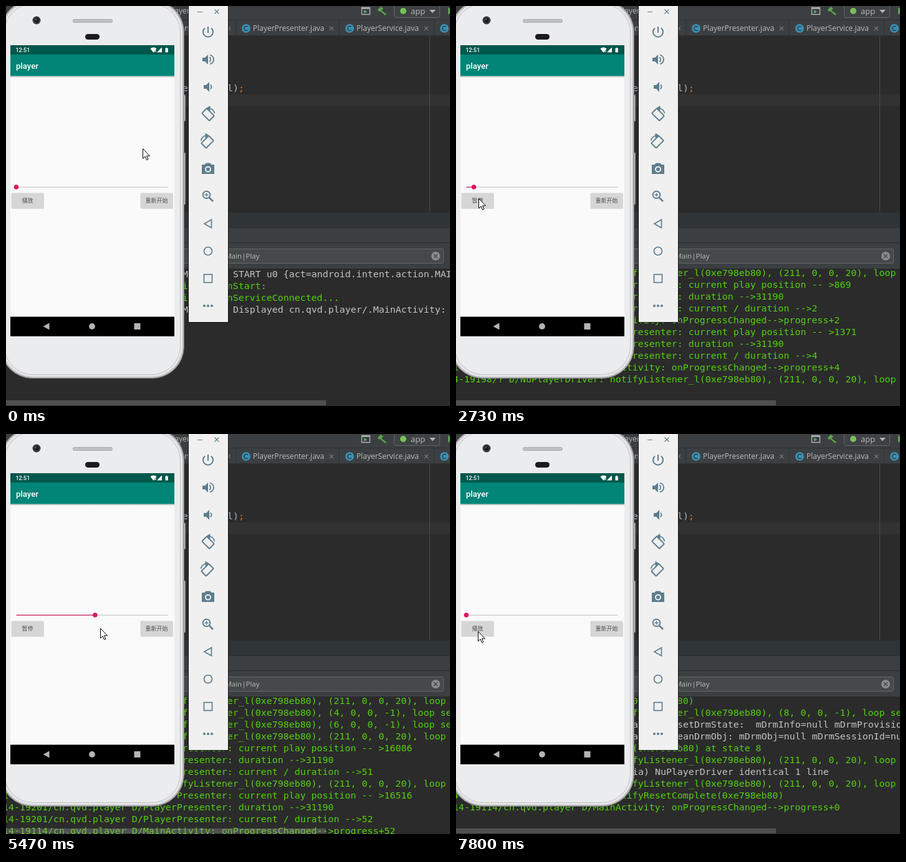
An HTML page for the animation above (8 s loop, 712 by 643 pixels).

```html
<!DOCTYPE html>
<html lang="en">
<head>
<meta charset="utf-8">
<title>Player demo</title>
<style>
  html, body { margin: 0; width: 100%; height: 100%; overflow: hidden; background: #2b2b2b; }
  svg { display: block; width: 712px; height: 643px; }
  text { white-space: pre; }
  .ui { font: 12px "Open Sans", "Noto Sans", sans-serif; fill: #bbb; }
  .mono { font: 14.95px "DejaVu Sans Mono", monospace; }
  .phone { font-family: Roboto, sans-serif; fill: #fff; }
  .btn { font: 9px "Noto Sans CJK SC", "Noto Sans CJK", sans-serif; fill: #505050; text-anchor: middle; }
  .tool { fill: none; stroke: #5d7d8d; stroke-width: 2; }
  .tool .solid { fill: #5d7d8d; stroke: none; }
</style>
</head>
<body>
<svg viewBox="0 0 712 643">
  <defs>
    <clipPath id="logClip"><rect y="423" width="712" height="220"/></clipPath>
    <linearGradient id="shade" x2="0" y2="1">
      <stop stop-color="#000" stop-opacity=".3"/><stop offset="1" stop-color="#000" stop-opacity="0"/>
    </linearGradient>
    <g id="classTab">
      <circle cx="17" cy="36" r="7" fill="#3d8fb2"/>
      <path d="M19.8 33.6a3.5 3.5 0 1 0 0 4.8" fill="none" stroke="#26414e" stroke-width="1.5"/>
    </g>
    <path id="cross" d="M-3-3 3 3M3-3-3 3" fill="none" stroke="#777" stroke-width="1.1"/>
    <g id="rotate">
      <rect x="-5.5" y="-8.5" width="11" height="17" rx="1" transform="rotate(-45)"/>
      <path d="M1-10.500A11 11 0 0 1 10.500-2" stroke-width="1.6"/>
      <path class="solid" d="M-1-10.500 2.500-12.500V-8Z"/>
    </g>
  </defs>

  <!-- editor window -->
  <g>
    <rect width="712" height="48" fill="#3c3f41"/>
    <path d="M240 22.500H712M368.500 23V48M534.500 23V48M686.500 23V48M286 47.500H712" stroke="#2e3133" fill="none"/>
    <text class="ui" x="260" y="12">Player</text>
    <text class="ui" x="279" y="40">on</text>
    <use href="#cross" x="357" y="36"/>
    <use href="#classTab" x="368"/>
    <text class="ui" x="396" y="40">PlayerPresenter.java</text>
    <use href="#cross" x="522" y="36"/>
    <use href="#classTab" x="534"/>
    <text class="ui" x="562" y="40">PlayerService.java</text>
    <use href="#cross" x="674" y="36"/>
    <use href="#classTab" x="686"/>
    <path d="M570.500 2.500H583.500V13.500H570.500ZM570 4H584" fill="none" stroke="#afb1b3" stroke-width="1.4"/>
    <path d="M574 6 579 9 574 12Z" fill="#59a869"/>
    <path d="M596 6 601 1 605 4 602 7 610 13 608 15 600 8 598 9Z" fill="#59a84b"/>
    <rect x="622.500" y="-4" width="73" height="22.500" rx="3" fill="#3f4244" stroke="#646769"/>
    <circle cx="637" cy="8" r="5" fill="#78c257"/>
    <text class="ui" x="649" y="13" style="font-size:13px">app</text>
    <path d="M679 6H689L684 11.500Z" fill="#afb1b3"/>
    <path d="M709 2 716 8 709 14Z" fill="#59a84b"/>

    <rect y="48" width="712" height="283" fill="#2b2b2b"/>
    <rect y="142" width="712" height="19" fill="#323232"/>
    <path d="M679.500 48V331" stroke="#4b4b4b"/>
    <g class="mono" fill="#a9b7c6">
      <text x="283" y="137">e</text>
      <text x="355" y="137">l)<tspan fill="#cc7832">;</tspan></text>
    </g>

    <rect y="331" width="712" height="92" fill="#3c3f41"/>
    <rect y="331" width="712" height="25" fill="#2f3437"/>
    <path d="M0 331.500H712M0 356.500H712M0 380.500H712M0 422.500H712" stroke="#292c2e"/>
    <rect x="240.500" y="390.500" width="461" height="23" rx="2" fill="#45494a" stroke="#646667"/>
    <text class="ui" x="406.500" y="406" text-anchor="end" style="font-size:11.5px">Main|Play</text>
    <circle cx="689" cy="402" r="7" fill="#8a8d8f"/>
    <path d="M686 399 692 405M692 399 686 405" stroke="#45494a" stroke-width="1.5"/>
    <rect y="423" width="712" height="220" fill="#2b2b2b"/>
    <g id="log" class="mono" clip-path="url(#logClip)"></g>
    <rect y="634" width="513" height="8" fill="#a6a6a6" fill-opacity=".3"/>
  </g>

  <!-- phone -->
  <g class="phone">
    <path d="M285 143H287.500V185H285ZM285 236H287.500V319H285Z" fill="#d8d8da" stroke="#77797c"/>
    <rect x="-8.500" y="-9.500" width="294" height="608" rx="51" fill="#b9b8bb" stroke="#77767a"/>
    <rect x="-6" y="-7" width="289" height="603" rx="49" fill="#e6e6e8"/>
    <rect x="-2.500" y="-3.500" width="282" height="596" rx="46" fill="#ebecee" stroke="#c2c2c6"/>
    <circle cx="49" cy="23" r="6.500" fill="#3a3a3c"/>
    <circle cx="49" cy="23" r="3.500" fill="#17181c"/>
    <circle cx="48" cy="22" r="1.300" fill="#65686f"/>
    <rect x="107.500" y="21.500" width="63" height="5" rx="2" fill="#bfc0c3" stroke="#aaabae"/>
    <rect x="127" y="45" width="23" height="9" rx="4.500" fill="#1b1b1d"/>

    <rect x="7" y="63" width="263" height="468" fill="#fafafa"/>
    <rect x="7" y="112.500" width="263" height="3" fill="url(#shade)"/>
    <rect x="7" y="78" width="263" height="34.500" fill="#008577"/>
    <rect x="7" y="63" width="263" height="15" fill="#00574b"/>
    <text x="15.500" y="74" font-size="9" font-weight="500">12:51</text>
    <text x="16" y="101" font-size="13.2" font-weight="500">player</text>
    <path d="M231.500 68.500Q236.500 64.500 241.500 68.500L236.500 75ZM250 66.500V74.500H242ZM255.500 68H256.500V67H258.500V68H259.800V74.500H255.500Z"/>
    <path d="M238 71 241 74M241 71 238 74" stroke="#fff"/>
    <rect x="7" y="499.500" width="263" height="31.500" fill="#000"/>
    <path d="M59.500 515 69.500 509.500V520.500ZM205.500 510H215.500V520H205.500Z" fill="#b4b4b4"/>
    <circle cx="138" cy="515" r="4.900" fill="#b4b4b4"/>

    <path d="M16.500 291.300H259.500" stroke="#d2d2d2" stroke-width="1.5"/>
    <path id="played" stroke="#d81b60" stroke-opacity=".8" stroke-width="1.5"/>
    <circle id="halo" cy="291" r="10" fill="#d81b60" fill-opacity=".25"/>
    <circle id="thumb" cy="291" r="3.800" fill="#d81b60"/>

    <path d="M9 302.500H61V326H9ZM216 302.500H268V326H216Z" fill="#000" fill-opacity=".14"/>
    <rect id="playBtn" x="8.500" y="300.500" width="52" height="24" rx="1.2"/>
    <rect id="resetBtn" x="215.500" y="300.500" width="52" height="24" rx="1.2"/>
    <text id="playLabel" class="btn" x="34.500" y="315.700"></text>
    <text class="btn" x="241.500" y="315.700">重新开始</text>
  </g>

  <!-- emulator toolbar -->
  <rect x="292.500" y="-2" width="64" height="510.500" fill="#f0f0f0" stroke="#151515"/>
  <g class="tool">
    <path d="M307 9.500H315M334.500 5.500 341.500 12.500M341.500 5.500 334.500 12.500" stroke-width="1.2"/>
    <path d="M324 33V43M319 35.500A8 8 0 1 0 329 35.500"/>
    <path class="solid" d="M315 83H319L324 78V94L319 89H315ZM317 127H321L326 122V138L321 133H317Z"/>
    <path d="M326.500 82Q329.500 86 326.500 90M327 78.500C335 81 335 91 327 93.500M328 126.500Q331 130 328 133.500" stroke-width="1.8"/>
    <use href="#rotate" x="324" y="174.500"/>
    <use href="#rotate" transform="matrix(-1 0 0 1 323 218.500)"/>
    <path class="solid" fill-rule="evenodd" d="M314 255H318.500L320.500 252.500H327.500L329.500 255H334V270H314ZM324 257.500A5 5 0 1 0 324 267.500 5 5 0 1 0 324 257.500Z"/>
    <circle class="solid" cx="324" cy="262.500" r="3"/>
    <circle cx="321.500" cy="303.500" r="5.800"/>
    <path d="M326 308 332 314" stroke-width="2.5"/>
    <path d="M318.500 303.500H324.500M321.500 300.500V306.500" stroke-width="1.4"/>
    <path d="M318 350 329.500 343.500V356.500Z" stroke-width="1.7"/>
    <circle cx="324" cy="394" r="6.500" stroke-width="1.7"/>
    <rect x="317.500" y="431.500" width="13" height="13" stroke-width="1.7"/>
    <g class="solid"><circle cx="318" cy="482" r="2"/><circle cx="324" cy="482" r="2"/><circle cx="330" cy="482" r="2"/></g>
  </g>

  <path id="cursor" d="M.5.500V16.200L4.100 12.800 6.600 18.600 9 17.500 6.500 12H11.500Z" fill="#fff" stroke="#000"/>
</svg>

<script>
const LOOP = 8000, TICK = 1000 / 15;
const MAX_ROWS = 12, ROW_HEIGHT = 19, DURATION = 31190;
const PLAY = 670, SEEK = 4450, RESET = 6590;
const POLL_EVERY = 490, LOG_LAG = 165, EVENT_LAG = 225, SCROLL_LAG = 60;
const GREEN = '#55cf12', GREY = '#c4c4c4';
const $ = id => document.getElementById(id);

// Build the session: log lines and seek bar positions, each with its time
const lines = [];
const marks = [{ at: 0, percent: 0 }];
let clock = -EVENT_LAG;

const add = (x, text, fill = GREEN, lag = EVENT_LAG) => lines.push({ at: clock + lag, x, text, fill });
const activity = (text, lag) => add(-5, '14-19114/cn.qvd.player D/MainActivity: ' + text, GREEN, lag);
const presenter = text => add(-5, '14-19201/cn.qvd.player D/PlayerPresenter: ' + text, GREEN, LOG_LAG);
const driver = (text, x = -14) => add(x, '14-19198/? D/NuPlayerDriver: ' + text);
const system = (text, x = 211) => add(x, text, GREY);
const notify = (args = '211, 0, 0, 20') =>
  driver(`notifyListener_l(0xe798eb80), (${args}), loop setting(0, 0)`);

function setProgress(percent) {
  if (percent === marks.at(-1).percent) return;
  marks.push({ at: clock, percent });
  activity('onProgressChanged-->progress+' + percent, LOG_LAG);
}
function poll(position, wait = POLL_EVERY) {
  clock += wait;
  const percent = Math.floor(100 * position / DURATION);
  presenter('current play position -- >' + position);
  presenter('duration -->' + DURATION);
  presenter('current / duration -->' + percent);
  setProgress(percent);
}

system('ActivityManager: START u0 {act=android.intent.action.MAIN');
activity('onStart:');
activity('onServiceConnected...');
system('ActivityManager: Displayed cn.qvd.player/.MainActivity: +1s');

clock = PLAY - EVENT_LAG + 60;
driver('start(0xe798eb80), state is 4, eos is 0');
notify('5, 0, 0, 0');
clock = PLAY;
poll(0, 100);
notify('6, 0, 0, -1'); notify(); notify();
poll(366); notify();
poll(869); poll(1371); notify();
poll(1871); notify();
poll(2373); poll(2875); notify();
poll(3377);

clock = SEEK;
setProgress(51);
notify(); notify('4, 0, 0, -1'); notify('6, 0, 0, -1'); notify();
poll(16086, 350); notify();
poll(16516); poll(17019); poll(17521);

clock = RESET;
driver('stop(0xe798eb80)', -23);
notify('8, 0, 0, -1');
system('MediaPlayer: resetDrmState:  mDrmInfo=null mDrmProvisioning', 220);
system('MediaPlayer: cleanDrmObj: mDrmObj=null mDrmSessionId=null', 220);
driver('reset(0xe798eb80) at state 8', -23);
notify();
system('uid=1013(media) NuPlayerDriver identical 1 line', 175);
notify();
driver('notifyResetComplete(0xe798eb80)');
setProgress(0);

// Pointer moves; bow bends the way downwards
const moves = [];
let pointer = { x: 219, y: 229 };
function move(start, end, x, y, bow = 0) {
  const to = { x, y };
  moves.push({ start, end, from: pointer, to, bow });
  pointer = to;
}
move(0, 530, 36, 309, 215);
move(3200, 3870, 113, 286, -14);
move(3870, 4270, 140, 290);
move(5270, 5470, 151, 312);
move(5470, 5930, 240, 315);
move(7130, 7800, 35, 317, 10);

function pointerAt(t) {
  const { start, end, from, to, bow } = moves.findLast(m => m.start <= t);
  const k = Math.min(1, (t - start) / (end - start));
  const x = from.x + (to.x - from.x) * k;
  const y = from.y + (to.y - from.y) * k + bow * Math.sin(Math.PI * k);
  return [Math.round(x), Math.round(y)];
}

const arrived = t => lines.filter(line => line.at <= t).length;
// Rises and falls once
const pulse = (t, start, length = 400) => Math.sin(Math.PI * Math.min(1, Math.max(0, (t - start) / length)));
const buttonFill = press => {
  const v = 214 - 24 * press;
  return `rgb(${v},${v},${v})`;
};

const rows = Array.from({ length: MAX_ROWS }, () =>
  $('log').appendChild(document.createElementNS('http://www.w3.org/2000/svg', 'text')));

function draw(t) {
  // New lines first fill the spare rows, then the log settles
  const settledRows = t > SEEK + 900 && t < RESET ? MAX_ROWS : MAX_ROWS - 2;
  const end = arrived(t);
  const top = Math.max(0, end - MAX_ROWS, arrived(t - SCROLL_LAG) - settledRows);
  const padding = top ? 0 : 2;
  rows.forEach((row, i) => {
    const { x = 0, text = '', fill = GREEN } = lines.slice(0, end)[top + i] || {};
    row.textContent = text;
    row.setAttribute('x', x);
    row.setAttribute('y', 434 + padding + ROW_HEIGHT * i);
    row.setAttribute('fill', fill);
  });

  const x = 16.5 + 2.43 * marks.findLast(mark => mark.at <= t).percent;
  $('thumb').setAttribute('cx', x);
  $('halo').setAttribute('cx', x);
  $('halo').setAttribute('opacity', pulse(t, SEEK));
  $('played').setAttribute('d', `M16.5 291.300H${x}`);

  $('playLabel').textContent = t > PLAY + 100 && t < RESET ? '暂停' : '播放';
  $('playBtn').setAttribute('fill', buttonFill(pulse(t, PLAY - 60)));
  $('resetBtn').setAttribute('fill', buttonFill(pulse(t, RESET - 60)));
  $('cursor').setAttribute('transform', `translate(${pointerAt(t)})`);
}

const begin = performance.now();
let shown = -1;
function play() {
  const t = (performance.now() - begin) % LOOP;
  const tick = Math.floor((t + 3.4) / TICK);
  if (tick !== shown) draw(Math.round(tick * TICK / 10) * 10);
  shown = tick;
  requestAnimationFrame(play);
}
play();
</script>
</body>
</html>
```
